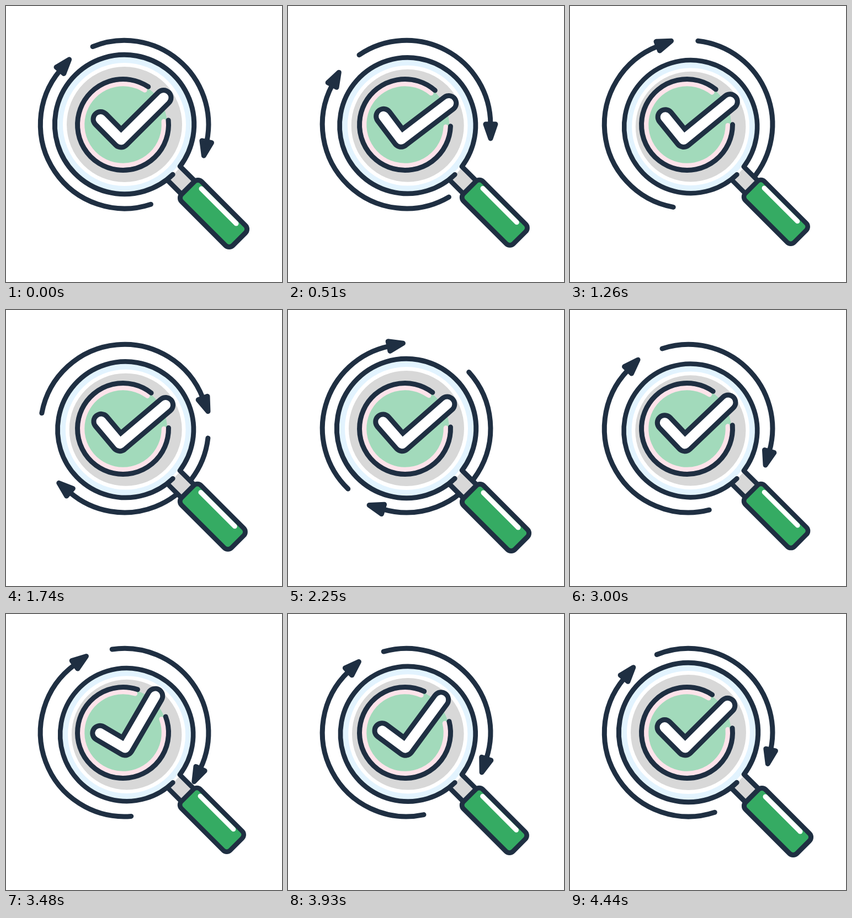
Write an HTML page that moves like this. It is 500x500 px and loops after 4500 ms.

```html
<!DOCTYPE html>
<html lang="en">
<head>
<meta charset="utf-8">
<title>Search check</title>
<style>
  html, body { margin: 0; width: 100%; height: 100%; overflow: hidden; background: #fff; }
  svg { display: block; width: 100vw; height: 100vh; }
  .line { fill: none; stroke: #1f2f42; stroke-width: 9; stroke-linecap: round; stroke-linejoin: round; }
  .head { fill: #1f2f42; }
</style>
</head>
<body>
<svg viewBox="0 0 500 500">
  <g id="arrows"></g>
  <g id="glass">
    <path fill="#d8d8d8" d="M294 316L316 292L342 318L320 342Z"/>
    <circle cx="214.5" cy="214.5" r="126" fill="#fff"/>
    <circle cx="214.5" cy="214.5" r="117" fill="none" stroke="#e2f3fe" stroke-width="11"/>
    <circle cx="214.5" cy="214.5" r="104.5" fill="#d8d8d8"/>
    <path fill="#d8d8d8" d="M303 306L316 292L324 300L311 314Z"/>
    <path id="rim" class="line"/>
    <path class="line" d="M294 317L318 341"/>
    <g transform="translate(376 376) rotate(45)">
      <rect class="line" x="-65.6" y="-25.6" width="131.2" height="51.2" rx="9.5" style="fill:#35ab63"/>
    </g>
    <path d="M354 331L417 394" stroke="#fff" stroke-width="9" stroke-linecap="round"/>
  </g>
  <g id="badge">
    <circle cx="212" cy="215" r="80" fill="#a2dabb"/>
    <path id="pink" fill="none" stroke="#fde3ea" stroke-width="8.5" stroke-linecap="round"/>
    <path id="ring" class="line"/>
    <path class="line" d="M171.5 205L208.5 242.5L285.5 166" style="stroke-width:36"/>
    <path class="line" d="M171.5 205L208.5 242.5L285.5 166" style="stroke-width:18;stroke:#fff"/>
  </g>
</svg>
<script>
const LOOP = 4500;
const MID = 214.6;
const $ = id => document.getElementById(id);

function polar(cx, cy, r, deg) {
  const a = deg * Math.PI / 180;
  return (cx + r * Math.cos(a)).toFixed(2) + ' ' + (cy + r * Math.sin(a)).toFixed(2);
}

function arc(cx, cy, r, from, to) {
  const large = to - from > 180 ? 1 : 0;
  return `M${polar(cx, cy, r, from)}A${r} ${r} 0 ${large} 1 ${polar(cx, cy, r, to)}`;
}

function arrow(from, to) {
  return `<path class="line" d="${arc(MID, MID, 152.3, from, to)}"/>
    <path class="line head" transform="translate(${MID} ${MID}) rotate(${to})"
      d="M143.3 0L161.3 0L152.3 26Z"/>`;
}

$('arrows').innerHTML = arrow(71.7, 220) + arrow(247.8, 371.8);
$('rim').setAttribute('d', arc(214.5, 214.5, 126.2, 46, 397) + 'L340 315');
$('ring').setAttribute('d', arc(212, 215, 82.5, -5.6, 303.7));
$('pink').setAttribute('d', arc(212, 215, 74, -4.6, 302.2));

const sine = u => (1 - Math.cos(Math.PI * u)) / 2;
const ease = (u, p) => u < 0.5 ? (2 * u) ** p / 2 : 1 - (2 - 2 * u) ** p / 2;

// One full turn with a wind-up before and an overshoot after.
function turn(t) {
  const back = 15, start = 725, end = 3245;
  if (t < start) return -back * sine(t / start);
  if (t < end) return -back + (360 + 2 * back) * ease((t - start) / (end - start), 1.75);
  return 360 + back * (1 - sine((t - end) / (LOOP - end)));
}

// Two pulses per loop, each resting briefly at its smallest size.
function zoom(t) {
  const p = t % 2250;
  const u = Math.min(1, Math.min(p, 2250 - p) / 1000);
  return 1 - 0.045 * ease(u, 3);
}

const tilt = [[0, 0], [510, 7.5], [1260, 5.5], [2250, 3.5], [3000, 1.2], [3480, -15], [4500, 0]];

// Smooth curve through the keys that never overshoots them.
function curve(keys, t) {
  const rate = i => (keys[i + 1][1] - keys[i][1]) / (keys[i + 1][0] - keys[i][0]);
  const slope = i => {
    if (i === 0 || i === keys.length - 1) return 0;
    const a = rate(i - 1), b = rate(i);
    return a * b > 0 ? 2 * a * b / (a + b) : 0;
  };
  let i = 0;
  while (i < keys.length - 2 && t >= keys[i + 1][0]) i++;
  const [t0, v0] = keys[i], [t1, v1] = keys[i + 1];
  const d = t1 - t0, u = (t - t0) / d, w = 1 - u;
  return v0 * w * w * (1 + 2 * u) + v1 * u * u * (3 - 2 * u)
    + d * u * w * (slope(i) * w - slope(i + 1) * u);
}

function draw(t) {
  $('arrows').setAttribute('transform', `rotate(${turn(t)} ${MID} ${MID})`);
  $('glass').setAttribute('transform', `translate(306 306) scale(${zoom(t)}) translate(-306 -306)`);
  $('badge').setAttribute('transform', `rotate(${curve(tilt, t)} 212 215)`);
}

const begin = performance.now();
function tick() {
  draw((performance.now() - begin) % LOOP);
  requestAnimationFrame(tick);
}
tick();
</script>
</body>
</html>
```
